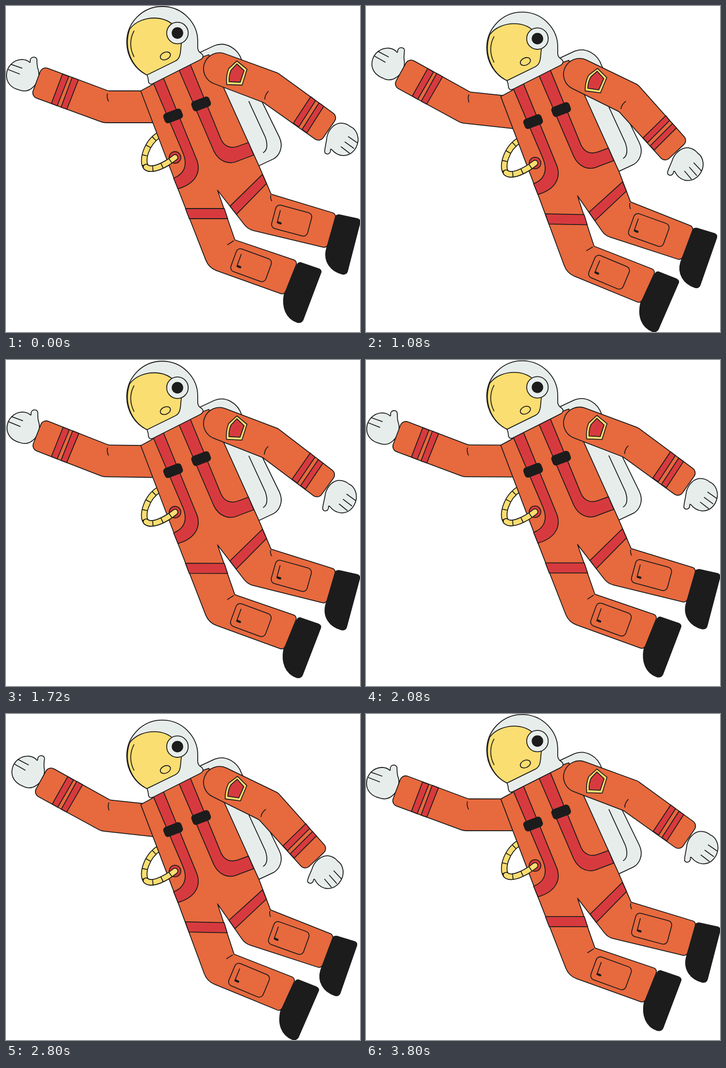
Recreate the animation shown at these times as an HTML page with a canvas. Size 733x676 px, loop 3840 ms.

```html
<!DOCTYPE html>
<html lang="en">
<head>
<meta charset="utf-8">
<title>Floating astronaut</title>
<style>
  html, body { margin: 0; width: 100%; height: 100%; overflow: hidden; background: #fff; }
  canvas { display: block; width: 733px; height: 676px; }
</style>
</head>
<body>
<canvas id="stage" width="733" height="676"></canvas>
<script>
const ctx = document.getElementById('stage').getContext('2d');
const INK = '#1c1c1c', ORANGE = '#e7693e', RED = '#d73a3e', YELLOW = '#fbde71', PALE = '#e7edeb';
const PERIOD = 1920, STEP = 40, LAG = 20, DROP = 12;

// root and joint positions, with the largest turn (degrees) of each half
const LIMBS = {
  armL: { root: [302, 200], joint: [207, 209], turn: [6.3, 8.8] },
  armR: { root: [442, 130], joint: [548, 170], turn: [5.8, 12.8] },
  legF: { root: [410, 400], joint: [474, 485], turn: [1.2, 2.8] },
  legB: { root: [438, 360], joint: [549, 390], turn: [2.4, 4.9] }
};

function pose(limb, k) {
  const [rx, ry] = limb.root, [jx, jy] = limb.joint;
  const [a, b] = limb.turn.map(v => v * k);
  const up = new DOMMatrix().translate(rx, ry + DROP * k).rotate(a).translate(-rx, -ry);
  const j = up.transformPoint({ x: jx, y: jy });
  const bend = angle => new DOMMatrix().translate(j.x, j.y).rotate(angle).translate(-jx, -jy);
  return { up, mid: bend((a + b) / 2), low: bend(b) };
}

function paint(fill, path) {
  const args = path ? [path] : [];
  if (fill) {
    ctx.fillStyle = fill;
    ctx.fill(...args);
  }
  ctx.stroke(...args);
}

const shape = (d, fill) => paint(fill, new Path2D(d));

function within(matrix, draw) {
  ctx.save();
  ctx.setTransform(matrix);
  draw();
  ctx.restore();
}

// points are [matrix, x, y, corner radius]
function outline(points, fill, begin) {
  const at = points.map(([m, x, y, r = 0]) => {
    const p = m.transformPoint({ x, y });
    return [p.x, p.y, r];
  });
  ctx.beginPath();
  if (begin) begin();
  at.forEach(([x, y, r], i) => {
    const next = at[(i + 1) % at.length];
    if (!i && !begin) ctx.moveTo(x, y);
    else if (r) ctx.arcTo(x, y, next[0], next[1], r);
    else ctx.lineTo(x, y);
  });
  ctx.closePath();
  paint(fill);
}

function disc(x, y, r, fill, ry = r, turn = 0) {
  ctx.beginPath();
  ctx.ellipse(x, y, r, ry, turn, 0, Math.PI * 2);
  paint(fill);
}

function plate(x, y, w, h, r, deg, fill) {
  ctx.save();
  ctx.translate(x, y);
  ctx.rotate(deg * Math.PI / 180);
  ctx.beginPath();
  ctx.roundRect(-w / 2, -h / 2, w, h, r);
  paint(fill);
  ctx.restore();
}

function hose(d) {
  const path = new Path2D(d);
  const line = (color, width) => {
    ctx.strokeStyle = color;
    ctx.lineWidth = width;
    ctx.stroke(path);
  };
  ctx.save();
  line(INK, 13.4);
  line(YELLOW, 9.8);
  ctx.lineCap = 'butt';
  ctx.setLineDash([1.8, 18.2]);
  ctx.lineDashOffset = -11;
  line(INK, 11);
  ctx.restore();
}

function pocket(x, y, deg, mark, latch) {
  plate(x, y, 77, 50, 9, deg);
  shape(mark);
  ctx.save();
  ctx.lineWidth = 4.6;
  shape(latch);
  ctx.restore();
}

function backpack() {
  shape('M400 97L432 82C455 73 480 88 488 112L566 272C576 293 565 311 554 317L520 333L440 165Z', PALE);
  shape('M503 198L537 272Q545 296 533 304');
}

function leftArm({ up, mid, low }) {
  within(low, () => {
    shape('M50 114C50 104 63 104 64 111C64 120 64 126 67 133C71 148 63 163 54 170C45 178 34 177 27 174C10 170 1 158 1 144C1 126 15 112 32 111C40 111 46 114 49 117Q51 117 50 114Z', PALE);
    shape('M10 121L33 129M5 132L28 141');
  });
  outline([
    [up, 320, 176], [mid, 212, 176, 12], [low, 75, 125, 12],
    [low, 52, 187, 12], [mid, 202, 242, 30], [up, 320, 242]
  ], ORANGE);
  within(low, () => {
    shape('M117 141L130 146L106 207L94 202Z', RED);
    shape('M137 148L150 153L126 214L114 210Z', RED);
  });
  within(mid, () => shape('M210 182Q208 189 212 197'));
}

function rightArm({ up, mid, low }, k) {
  within(low, () => {
    shape('M672 298C673 310 658 309 660 300C661 290 663 284 664 276C665 262 675 246 690 243C700 242 707 245 713 250C724 254 730 268 729 280C726 300 712 311 697 310C687 309 680 304 675 298Q672 295 672 298Z', PALE);
    shape('M709 271L728 284M702 282L720 295M694 292L711 305');
  });
  const [x, y] = LIMBS.armR.root;
  const lean = (20 + LIMBS.armR.turn[0] * k) * Math.PI / 180;
  outline([
    [mid, 563, 139, 20], [low, 687, 229, 12], [low, 650, 283, 12], [mid, 533, 200, 12], [up, 430.7, 161]
  ], ORANGE, () => ctx.arc(x, y + DROP * k, 33, lean + Math.PI / 2, lean + Math.PI * 1.5));
  within(low, () => {
    shape('M631 188L641 196L606 251L595 243Z', RED);
    shape('M648 201L658 208L623 263L613 256Z', RED);
  });
  within(mid, () => shape('M543 177Q536 184 536 193'));
  within(up, () => {
    shape('M478 114L499 131L489 164L457 163Q455 145 461 130Z', YELLOW);
    shape('M478 120L493 134L485 158L462 157Q461 144 466 133Z', RED);
  });
}

function suit(body, front, back) {
  within(front.low, () =>
    shape('M610 532L648 545Q654 548 652 553L615 651Q611 658 603 656C580 648 571 625 576 598L602 538Q605 531 610 532Z', INK));
  within(back.low, () =>
    shape('M691 433L728 441Q734 443 733 449L707 550Q705 557 697 556C672 550 658 530 663 506L680 440Q683 432 691 433Z', INK));
  outline([
    [body, 279, 176], [body, 303, 163], [body, 312, 150], [body, 400, 108], [body, 420, 101], [body, 524, 332],
    [back.up, 549, 390], [back.low, 684, 431, 8], [back.low, 664, 502, 8], [back.mid, 501, 463, 35],
    [body, 438, 382],
    [front.up, 474, 485], [front.low, 604, 529, 8], [front.low, 576, 599, 8], [front.mid, 420, 543, 38],
    [body, 356, 379]
  ], ORANGE);
  within(front.up, () => shape('M371.5 420H452L459 441H379.5Z', RED));
  within(back.up, () => shape('M531 349L464 415L477 432L539.5 368Z', RED));
  within(front.low, () => {
    shape('M471 487L459 495');
    pocket(507.5, 537.5, 20, 'M487 515L478 540', 'M480 539.5L485 541.5');
  });
  within(back.low, () => {
    shape('M548 393Q547 398 550 404');
    pocket(591.5, 445, 15, 'M568 424L561.5 449', 'M563.5 449L568.5 450.5');
  });
}

function chest() {
  shape('M298 143L367 306C377 331 368 349 347 357L356 379C388 370 408 347 393 314L319 132Z', RED);
  shape('M352 118L430 300C440 321 460 331 481 321L513 309L502 283L480 291C466 296 452 292 445 276L375 105Z', RED);
  plate(346, 228, 38, 20, 6, -21, INK);
  plate(404, 203, 38, 20, 6, -21, INK);
  disc(350, 314, 12, RED);
  hose('M350 314C330 330 302 344 290 334');
}

function helmet() {
  shape('M292 143C268 132 250 106 250 75C250 34 283 1 323.5 1C366 1 397 36 397 73V86Q397 92 401 96Q409 101 408 105Q407 109 403 111L304 161Q297 164 295 157Q295 150 292 143Z', PALE);
  shape('M256 48C268 32 288 25 307 25C340 25 363 48 363 78C361 92 363 108 351 114L292 143C262 128 242 90 256 48Z', YELLOW);
  shape('M265 52C256 68 256 88 265 105');
  disc(330, 103.5, 11, YELLOW, 7.5, -0.42);
  disc(355, 56, 22.3, PALE);
  disc(355, 56, 11, INK);
}

function draw(time) {
  const t = Math.floor(time / STEP) * STEP - LAG;
  const k = (1 - Math.cos(t / PERIOD * Math.PI * 2)) / 2;
  const body = new DOMMatrix().translate(0, DROP * k);
  ctx.setTransform(1, 0, 0, 1, 0, 0);
  ctx.clearRect(0, 0, 733, 676);
  ctx.strokeStyle = INK;
  ctx.lineWidth = 1.8;
  ctx.lineJoin = ctx.lineCap = 'round';
  within(body, () => {
    backpack();
    hose('M350 314C330 330 302 344 290 334C280 322 290 284 317 267');
  });
  leftArm(pose(LIMBS.armL, k));
  suit(body, pose(LIMBS.legF, k), pose(LIMBS.legB, k));
  within(body, () => {
    chest();
    helmet();
  });
  rightArm(pose(LIMBS.armR, k), k);
}

let start;
function tick(now) {
  start ??= now;
  draw(Math.max(0, now - start));
  requestAnimationFrame(tick);
}
draw(0);
requestAnimationFrame(tick);
</script>
</body>
</html>
```
